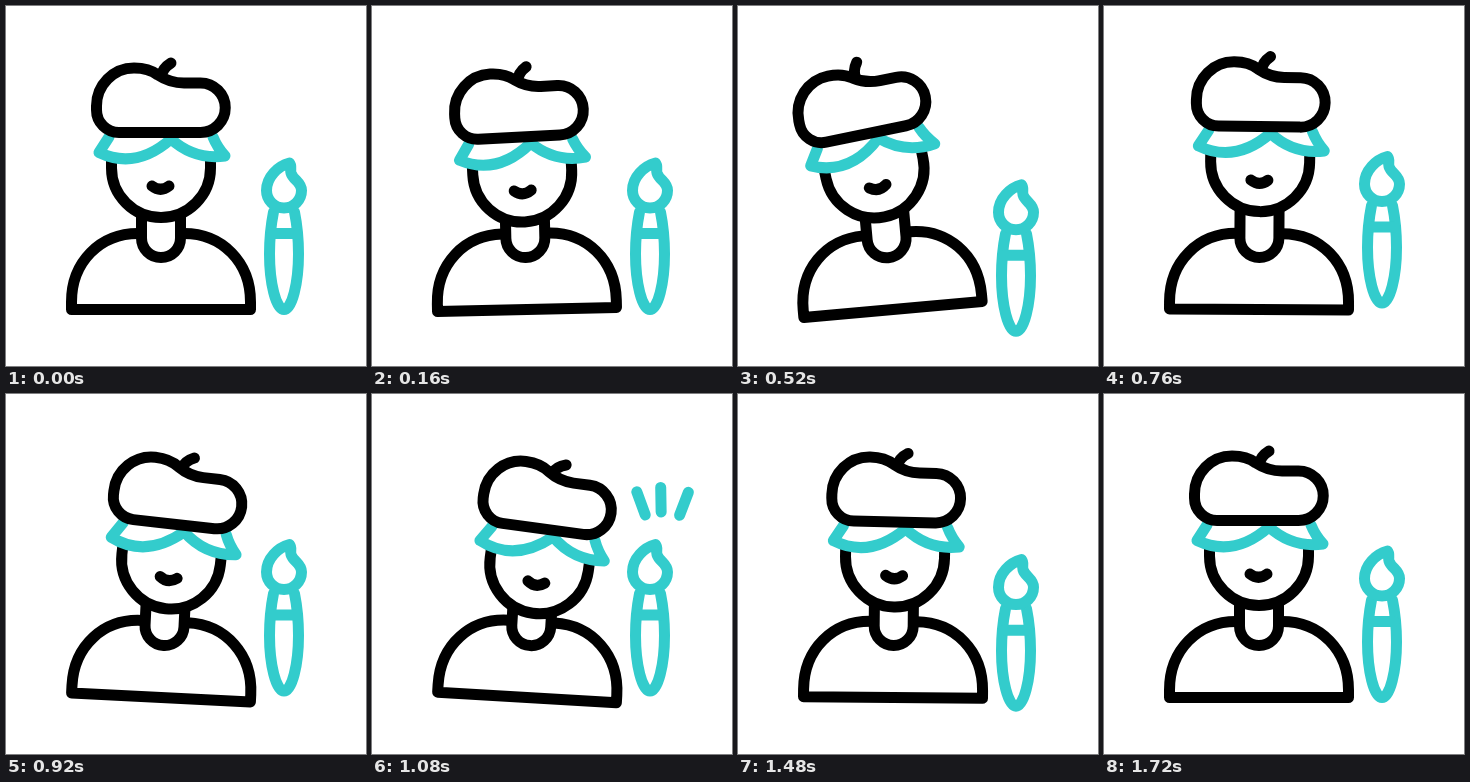
Animation, 360 px wide and 360 px high, one loop 2000 ms. Source, as an HTML page:

```html
<!DOCTYPE html>
<html lang="en">
<head>
<meta charset="utf-8">
<title>Painter</title>
<style>
  html, body { margin: 0; width: 100%; height: 100%; overflow: hidden; background: #fff; }
  svg { display: block; width: 100%; height: 100%; }
  g { fill: #fff; stroke: #000; stroke-width: 11; stroke-linecap: round; stroke-linejoin: round; }
  .teal { stroke: #33cccc; }
  .line { fill: none; }
</style>
</head>
<body>
<svg viewBox="0 0 360 360">
  <g id="body">
    <path d="M65.5 303.5V296C65.5 256 94 227.5 132 227.5H178C216 227.5 244.5 256 244.5 296V303.5Z"/>
    <path d="M135.5 198V232A19.5 19.5 0 0 0 174.5 232V198"/>
  </g>
  <g id="head">
    <path d="M105.5 152V162A49.5 49.5 0 0 0 204.5 162V152"/>
    <path class="line" d="M146 180Q154.5 186.5 163 180"/>
    <path class="teal" d="M103 131L93 146.5Q130 164 165 133Q188 154 219 150Q211 141 207 131"/>
    <path id="stem" class="line" d="M155 71C156 64 160 60 165 57"/>
    <path d="M113 126.5H194.5A24.7 24.7 0 0 0 194.5 77H178C165 77 158 73 152 69C146 64.500 138 62 128 62A37.5 38 0 0 0 90.5 100V104A22.5 22.5 0 0 0 113 126.5Z"/>
  </g>
  <g id="brush" class="teal">
    <path d="M267.5 206C264.5 221 263.5 235 263.5 248C263.5 277 270 303.5 278 303.5C286 303.5 292.5 277 292.5 248C292.5 235 291.5 221 288.5 206"/>
    <path class="line" d="M266 227.5H290"/>
    <path d="M283.5 157C272 160 260.5 171 260.5 184.5A17.5 17.5 0 0 0 295.5 184.5C295.5 176 287 174 285 167C284 163 286 160 283.5 157Z"/>
  </g>
  <g id="rays" class="teal">
    <path transform="rotate(-20 290 167)"/>
    <path transform="rotate(-1 290 167)"/>
    <path transform="rotate(21 290 167)"/>
  </g>
</svg>
<script>
const LOOP = 2000, STEP = 40;
const $ = id => document.getElementById(id);
const move = (id, value) => $(id).setAttribute('transform', value);
const ramp = (t, from, to) => Math.min(1, Math.max(0, (t - from) / (to - from)));

// Smooth curve through [time, value] keys that never overshoots them.
const curve = (...keys) => t => {
  const last = keys.length - 1;
  if (t <= keys[0][0]) return keys[0][1];
  if (t >= keys[last][0]) return keys[last][1];
  const rise = i => (keys[i + 1][1] - keys[i][1]) / (keys[i + 1][0] - keys[i][0]);
  const slope = i => {
    if (i === 0 || i === last) return 0;
    const a = rise(i - 1), b = rise(i);
    return a * b > 0 ? 2 * a * b / (a + b) : 0;
  };
  const i = keys.findIndex(key => key[0] > t) - 1;
  const [t0, v0] = keys[i], [t1, v1] = keys[i + 1];
  const span = t1 - t0, u = (t - t0) / span, w = 1 - u;
  return v0 * w * w * (1 + 2 * u) + v1 * u * u * (3 - 2 * u)
    + span * u * w * (slope(i) * w - slope(i + 1) * u);
};

// One sway drives body, head and stem; the head also bobs.
const sway = curve([0, 0], [490, -1], [760, 0.06], [1030, 0.68], [1280, 0.28], [1720, 0]);
const bob = curve([0, 0], [310, 8.6], [520, 0.5], [660, -8.5], [1060, 8.3], [1280, 4], [1720, 0]);
const dip = curve([200, 0], [540, 22], [760, -6.5], [1080, -6.5], [1290, 14.7], [1720, 0]);

function draw(t) {
  const s = sway(t);
  move('body', `rotate(${5.3 * s} 155 303.5)`);
  move('head', `translate(${19 * s} ${bob(t)}) rotate(${12 * s} 155 162)`);
  move('stem', `rotate(${22 * sway(t - 60)} 155 71)`);
  move('brush', `translate(0 ${dip(t)})`);

  // Rays shoot outwards: the tip leads and the tail catches up.
  const tip = ramp(t, 960, 1160), tail = ramp(t, 1080, 1240);
  $('rays').style.display = tip > tail ? '' : 'none';
  for (const ray of $('rays').children)
    ray.setAttribute('d', `M290 ${118 - 41 * tail}V${118 - 41 * tip}`);
}

const start = performance.now();
function tick() {
  const t = (performance.now() - start) % LOOP;
  draw(Math.floor(t / STEP) * STEP);
  requestAnimationFrame(tick);
}
tick();
</script>
</body>
</html>
```
